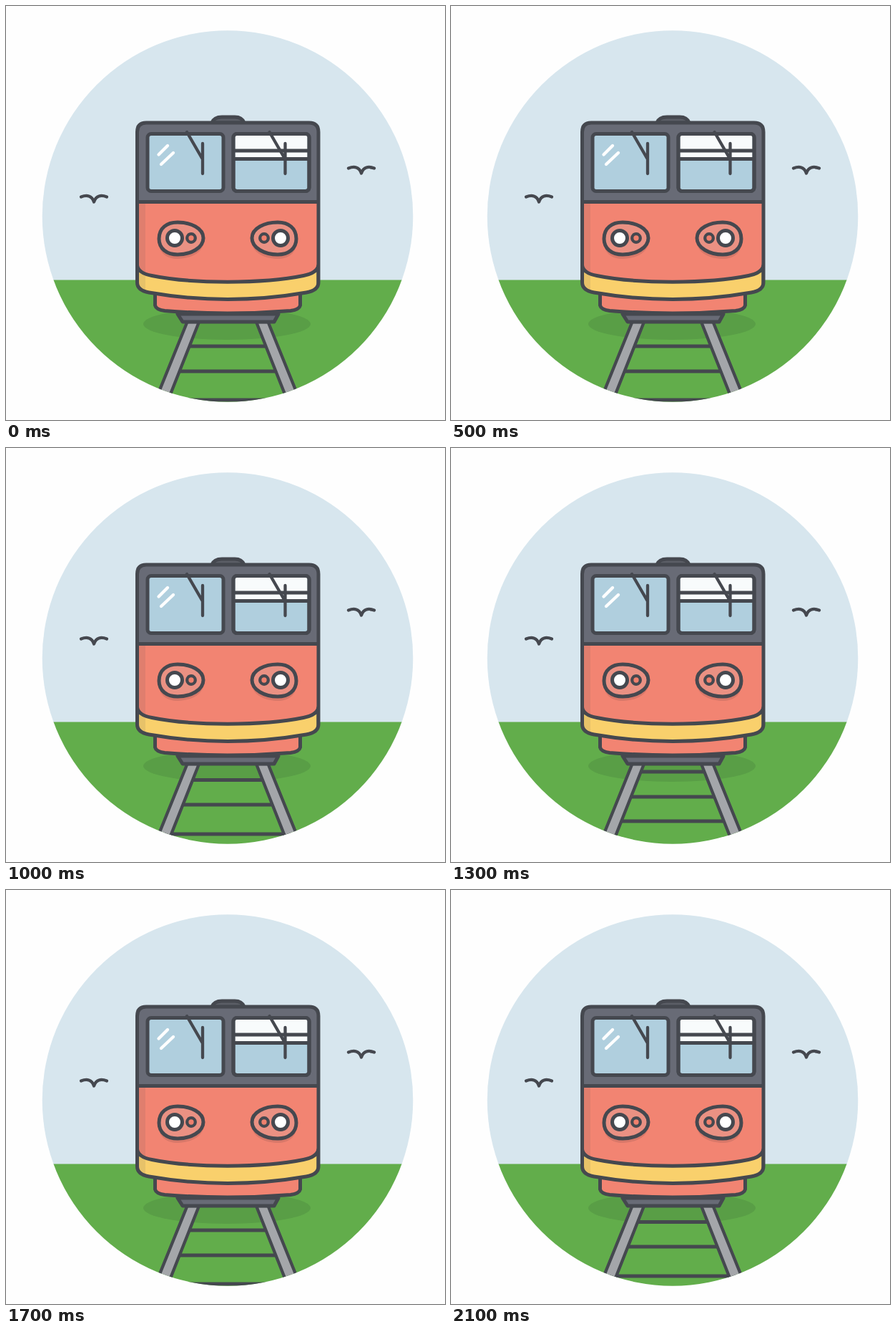
These frames come from a looping animation (614x578 px, 2200 ms). An HTML page:

```html
<!DOCTYPE html>
<html lang="en">
<head>
<meta charset="utf-8">
<title>Train on the track</title>
<style>
  html, body { margin: 0; width: 100%; height: 100%; overflow: hidden; background: #fefefe; }
  svg { display: block; width: 614px; height: 578px; }
  .ink { stroke: #45484f; stroke-width: 5; stroke-linecap: round; stroke-linejoin: round; }
  .thin { stroke-width: 4.3; }
  .line { fill: none; }
</style>
</head>
<body>
<svg viewBox="0 0 614 578">
  <defs>
    <clipPath id="disc"><circle cx="310" cy="293.5" r="259.3"/></clipPath>
    <path id="hull" d="M183.5 176Q183.5 163 196 163H424Q437 163 437 176V386Q437 397 420 400Q310 419 200 400Q183.5 397 183.5 386Z"/>
    <clipPath id="body"><use href="#hull"/></clipPath>
    <path id="bird" class="ink thin line" d="M-18 -7C-10 -10 -3 -9 0 0C3 -9 10 -10 18 -7"/>
    <path id="egg" d="M214 325C214 310 225 302 240 302C258 302 276 310 276 324C276 338 258 347 240 347C225 347 214 339 214 325Z"/>
    <path id="rail" class="ink thin" fill="#a4a6aa" d="M253.5 441L208.5 552H226L270 441Z"/>
    <g id="lamp">
      <use href="#egg" y="6" fill="#d97869"/>
      <use href="#egg" class="ink" fill="#ea9183"/>
      <circle class="ink" cx="236" cy="324" r="10.5" fill="#fff"/>
      <circle class="ink thin" cx="259" cy="324" r="5.8" fill="#ef806d"/>
    </g>
    <path id="wiper" class="ink thin line" d="M253 176L275 214M275 192V234"/>
    <rect id="pane" class="ink" x="198" y="178.5" width="106" height="80" rx="5"/>
  </defs>

  <g clip-path="url(#disc)">
    <path fill="#d7e6ee" d="M0 0H614V383H0Z"/>
    <path fill="#62ad4b" d="M0 382.6H614V578H0Z"/>
    <ellipse cx="309" cy="444" rx="117" ry="22" fill="#599e46"/>
    <path id="ties" class="ink line"/>
    <use href="#rail"/>
    <use href="#rail" transform="matrix(-1 0 0 1 620 0)"/>
  </g>

  <use href="#bird" x="123" y="273.5"/>
  <use href="#bird" x="497" y="233.5"/>

  <g class="ink">
    <path fill="#686b76" d="M240 430H381L375 441H247Z"/>
    <path fill="#f28472" d="M208.5 400V418Q210 424 222 425.5Q310 432.5 398 425.5Q410 424 411.5 418V400Z"/>
    <path fill="#5b5e66" d="M288 163Q291 155 302 155H320Q330 155 333 163Z"/>
  </g>

  <g clip-path="url(#body)">
    <path fill="#686b76" d="M180 160H440V274H180Z"/>
    <path fill="#f28472" d="M180 273H440V420H180Z"/>
    <g id="stripe">
      <path class="ink" fill="#f9d06c" d="M183.5 362Q185 373 204 376.5C260 388 360 388 416 376.5Q435 373 437 362V425H183.5Z"/>
    </g>
    <path fill="#45484f" opacity=".1" d="M184 273H195V420H184Z"/>
    <path class="ink line" d="M184 273.5H437"/>
  </g>
  <use href="#hull" class="ink line"/>

  <use href="#pane" fill="#b0cfde"/>
  <use href="#pane" x="120" fill="#b0cfde"/>
  <path fill="#f8fbfc" d="M320.5 181H421.5V213H320.5Z"/>
  <path class="ink line" d="M319 202H423M319 213.5H423"/>
  <use href="#pane" x="120" class="line"/>
  <path d="M213.5 207.5L226 195M217 221L234 205" stroke="#fff" stroke-width="4.3" stroke-linecap="round"/>
  <use href="#wiper"/>
  <use href="#wiper" x="115.5"/>

  <use href="#lamp"/>
  <use href="#lamp" transform="matrix(-1 0 0 1 620 0)"/>
</svg>
<script>
  const LOOP = 2200, HOLD = 500, LEAD = 100;
  const ties = document.getElementById('ties');
  // Every third height belongs to the same pose.
  const heights = [452, 463.5, 475, 487, 498, 510, 521, 539, 550];

  function tie(y) {
    const half = 49 + (y - 443) * 0.402;
    return `M${310 - half} ${y}H${310 + half}`;
  }

  function draw(now) {
    const step = Math.max(0, Math.floor((now % LOOP - LEAD) / HOLD));
    const pose = 2 - step % 3;
    ties.setAttribute('d', heights.filter((_, i) => i % 3 === pose).map(tie).join(''));
  }

  const start = performance.now();
  function tick() {
    draw(performance.now() - start);
    requestAnimationFrame(tick);
  }
  tick();
</script>
</body>
</html>
```
